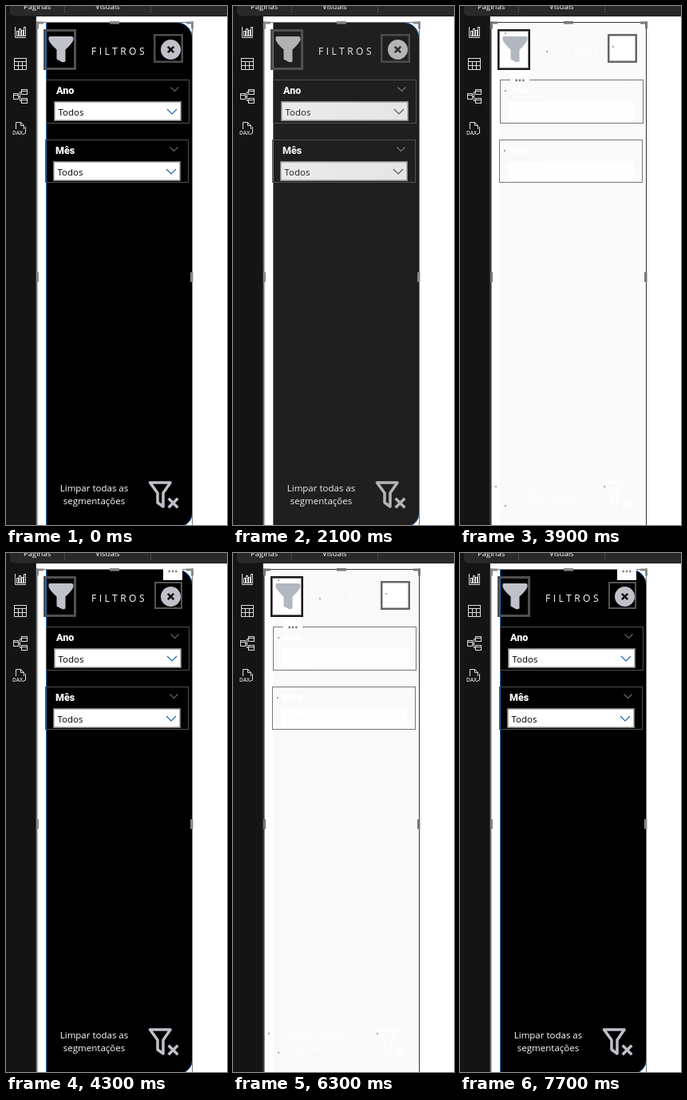
These frames come from a looping animation (277x649 px, 8000 ms). An HTML page with a canvas:

```html
<!DOCTYPE html>
<html lang="pt">
<head>
<meta charset="utf-8">
<style>
  html, body { margin: 0; width: 100%; height: 100%; overflow: hidden; background: #fff; }
  canvas { display: block; width: 277px; height: 649px; }
</style>
</head>
<body>
<canvas id="stage"></canvas>
<script>
const W = 277, H = 649, LOOP = 8000;
const canvas = document.getElementById('stage');
const ctx = canvas.getContext('2d');
const dpr = window.devicePixelRatio || 1;
canvas.width = W * dpr;
canvas.height = H * dpr;

const openings = [[1900, 0.43], [3900, 0.245], [6300, 0.43]];
const closings = [700, 3000, 4500];
const iconHovers = [1100, 3300, 4800];
const closeHovers = [100, 2400, 4000, 7000];

const last = (times, t) => Math.max(-1, ...times.filter(x => x <= t));

function stateAt(t) {
  const opened = last(openings.map(o => o[0]), t);
  const closed = last(closings, t);
  const visible = closed < 0 || opened > closed;
  const closing = !visible && t - closed < 100;
  let k = visible ? 1 : closing ? 0.02 : 0;
  if (visible && opened > 0) {
    const rate = openings.find(o => o[0] === opened)[1];
    k = Math.min(1, 0.02 + rate * Math.floor((t - opened) / 100));
  }
  const hover = last(closeHovers, t);
  const showHeader = closing || (visible && hover > opened);
  return {
    k, visible, closing,
    header: closing ? 1 : showHeader ? Math.min(1, (Math.floor((t - hover) / 100) + 1) / 4) : 0,
    iconHover: last(iconHovers, t) > closed && k < 0.1,
    dim: visible && k < 1
  };
}

function rect(x, y, w, h, color) {
  ctx.fillStyle = color;
  ctx.fillRect(x, y, w, h);
}

function frame(x, y, w, h, color, width = 1) {
  ctx.strokeStyle = color;
  ctx.lineWidth = width;
  ctx.strokeRect(x + width / 2, y + width / 2, w - width, h - width);
}

function line(points, color, width = 1, close = false) {
  ctx.beginPath();
  points.forEach(([x, y]) => ctx.lineTo(x, y));
  if (close) ctx.closePath();
  ctx.strokeStyle = color;
  ctx.lineWidth = width;
  ctx.stroke();
}

function disc(x, y, r, color) {
  ctx.beginPath();
  ctx.arc(x, y, r, 0, 7);
  ctx.fillStyle = color;
  ctx.fill();
}

function text(str, x, y, size, color, { align = 'left', weight = 500, spacing = 0, family = '"Open Sans"' } = {}) {
  ctx.font = `${weight} ${size}px ${family}, sans-serif`;
  ctx.letterSpacing = spacing + 'px';
  ctx.textAlign = align;
  ctx.fillStyle = color;
  ctx.fillText(str, x, y);
  ctx.letterSpacing = '0px';
}

function cross(x, y, r, color, width) {
  line([[x - r, y - r], [x + r, y + r]], color, width);
  line([[x - r, y + r], [x + r, y - r]], color, width);
}

const chevron = (x, y, r, color) => line([[x - r, y - r / 2], [x, y + r / 2], [x + r, y - r / 2]], color, 1.2);

function dots(x, y, color) {
  for (let i = -1; i <= 1; i++) disc(x + i * 4.3, y, 1.4, color);
}

function drawChrome() {
  rect(0, 0, W, H, '#fff');
  rect(38, 13, W - 38, 2, '#ececec');
  rect(0, 0, W, 13, '#151515');
  ctx.beginPath();
  ctx.roundRect(5, -8, W, 20.5, 5);
  ctx.fillStyle = '#292929';
  ctx.fill();
  rect(73, 0, 1, 9, '#484848');
  rect(181, 0, 1, 9, '#484848');
  text('Páginas', 22, 4, 9.5, '#fff');
  text('Visuais', 112, 4, 9.5, '#fff');
  rect(0, 13, 38, H - 13, '#141414');
  rect(37, 13, 1, H - 13, '#3a3a3a');

  const ink = '#dcdcdc';
  line([[11.5, 26], [11.5, 39.5], [25, 39.5]], ink);
  [[13, 31], [16, 28], [19, 30], [22, 26]].forEach(([x, y]) => frame(x, y, 3, 38 - y, ink));

  frame(10, 65, 16, 15, ink);
  line([[10, 69.5], [26, 69.5]], ink);
  line([[10, 74.5], [26, 74.5]], ink);
  line([[15.5, 69], [15.5, 80]], ink);
  line([[20.5, 69], [20.5, 80]], ink);

  frame(9, 109, 7, 8, ink);
  frame(19, 104, 8, 7, ink);
  frame(19, 115, 8, 7, ink);
  line([[9, 111.5], [16, 111.5]], ink);
  line([[19, 106.5], [27, 106.5]], ink);
  line([[19, 117.5], [27, 117.5]], ink);
  line([[19, 107.5], [17.5, 107.5], [17.5, 118.5], [19, 118.5]], ink);
  line([[16, 113.5], [17.5, 113.5]], ink);

  line([[12.5, 154], [12.5, 145.5], [18.5, 145.5], [22.5, 149.5], [22.5, 154]], ink);
  line([[18.5, 145.5], [18.5, 149.5], [22.5, 149.5]], ink);
  text('DAX', 8, 161, 6.5, ink, { weight: 600 });
  line([[21, 160.5], [24.5, 159], [24.5, 151]], ink);
}

function drawInput(x, y, dim) {
  const fill = ctx.createLinearGradient(x, 0, x + 160, 0);
  fill.addColorStop(0, dim ? '#e8e8e8' : '#fff');
  fill.addColorStop(1, dim ? '#e1e1e1' : '#fff');
  rect(x, y, 160, 25, fill);
  frame(x, y, 160, 25, '#777', 1.5);
  text('Todos', x + 5.5, y + 17.5, 11.5, '#000');
  chevron(x + 148, y + 13, 6, dim ? '#444' : '#2468a8');
}

function drawPanel({ k, dim }) {
  const pale = dim ? '#aaa' : '#c0c1c8';
  const white = dim ? '#ececec' : '#fff';
  ctx.beginPath();
  ctx.roundRect(50.5, 20.5, 183, 631, [0, 20, 18, 0]);
  ctx.fillStyle = '#000';
  ctx.fill();
  ctx.strokeStyle = '#1d69b8';
  ctx.lineWidth = 1;
  ctx.stroke();

  text('FILTROS', 107, 61, 12, white, { spacing: 3.5 });
  const label = { weight: 800, family: 'Roboto' };
  text('Ano', 63, 109.5, 12.5, white, label);
  text('Mês', 62, 185, 12.5, white, label);
  chevron(211.5, 104, 5, '#666');
  chevron(210.5, 179, 5, '#666');
  drawInput(60, 119, dim);
  drawInput(59, 194, dim);

  disc(206.5, 54.5, 12.5, pale);
  cross(206.5, 54.5, 3.7, '#111', 2.6);

  text('Limpar todas as', 110.5, 607, 11.5, white, { align: 'center' });
  text('segmentações', 110.5, 623, 11.5, white, { align: 'center' });
  ctx.lineJoin = 'round';
  line([[180.5, 596], [206, 596], [197, 609], [197, 626], [190, 621], [190, 609]], pale, 3.5, true);
  ctx.lineJoin = 'miter';
  cross(209.5, 621.5, 5.8, pale, 3.5);

  // Veil that fades the whole panel from white.
  rect(39, 16, 197, H - 16, `rgba(255,255,255,${1 - k})`);
}

function drawFilterButton({ k, iconHover, dim }) {
  const shut = k < 0.1;
  if (shut) rect(47, 29, 41, 51, '#fff');
  if (iconHover) {
    frame(47, 29, 41, 51, '#1c1a1a', 2);
    frame(49, 31, 37, 47, '#77717a', 1);
  } else {
    frame(47, 29, 41, 51, shut ? '#6b6666' : '#505050', 3);
  }
  ctx.beginPath();
  ctx.moveTo(55, 38);
  ctx.lineTo(82, 38);
  ctx.quadraticCurveTo(85, 38, 84.5, 42);
  ctx.quadraticCurveTo(84, 46, 74.5, 54.5);
  ctx.lineTo(74.5, 69);
  ctx.quadraticCurveTo(73.5, 71, 70, 70);
  ctx.lineTo(63.5, 66.5);
  ctx.lineTo(63.5, 54.5);
  ctx.quadraticCurveTo(54, 46, 53.5, 42);
  ctx.quadraticCurveTo(53, 38, 55, 38);
  ctx.fillStyle = shut ? '#b3b7bf' : dim ? '#b2b2b2' : '#c0c2ca';
  ctx.fill();
}

function drawCloseFrame({ k, closing, header }) {
  const shut = k < 0.1;
  if (shut) rect(185, 35, 37, 36, '#fff');
  if (closing) {
    frame(185, 35, 37, 36, '#222', 2);
    frame(187, 37, 33, 32, '#888');
  } else if (header) {
    frame(186, 36, 35, 34, '#555', 2);
  } else {
    frame(185, 35, 37, 36, shut ? '#666' : '#4c4c4c', 2.5);
  }
}

function drawSelection(k) {
  const shut = k < 0.1;
  const edge = shut ? '#333' : '#777';
  const grip = shut ? '#777' : '#888';
  rect(38, 20, 196, 1, edge);
  rect(38, 20, 1.5, H - 20, edge);
  rect(233, 20, 1, H - 20, edge);
  rect(38, 19.5, 9, 3, grip);
  rect(38, 19.5, 3, 9, grip);
  rect(226, 19.5, 9, 3, grip);
  rect(232, 19.5, 3, 9, grip);
  rect(130, 19, 12, 3.5, grip);
  rect(38, 333, 3, 12, grip);
  rect(231, 333, 3.5, 12, grip);
}

function draw(t) {
  const s = stateAt(t);
  const shut = s.k < 0.1;
  ctx.setTransform(dpr, 0, 0, dpr, 0, 0);
  drawChrome();
  if (s.k > 0) drawPanel(s);
  if (s.visible) {
    drawSelection(s.k);
    const border = shut ? '#777' : '#505050';
    frame(50, 92, 180, 55, border);
    frame(49, 167, 180, 54, border);
  }
  drawFilterButton(s);
  if (s.k > 0) drawCloseFrame(s);
  if (s.visible && shut) {
    [[57, 34], [109, 57], [192, 51], [57, 106], [56, 181], [45, 601], [181, 601], [57, 625]]
      .forEach(([x, y]) => disc(x, y, 1.2, '#aaa'));
  }
  if (s.iconHover) {
    rect(63, 81, 24, 14, '#fff');
    dots(75, 93, '#777');
  }
  if (s.header) {
    ctx.globalAlpha = s.header;
    rect(197, 19, 24, 15, '#fff');
    dots(209, 23, '#888');
    ctx.globalAlpha = 1;
  }
}

function tick() {
  draw(performance.now() % LOOP);
  requestAnimationFrame(tick);
}
tick();
</script>
</body>
</html>
```
